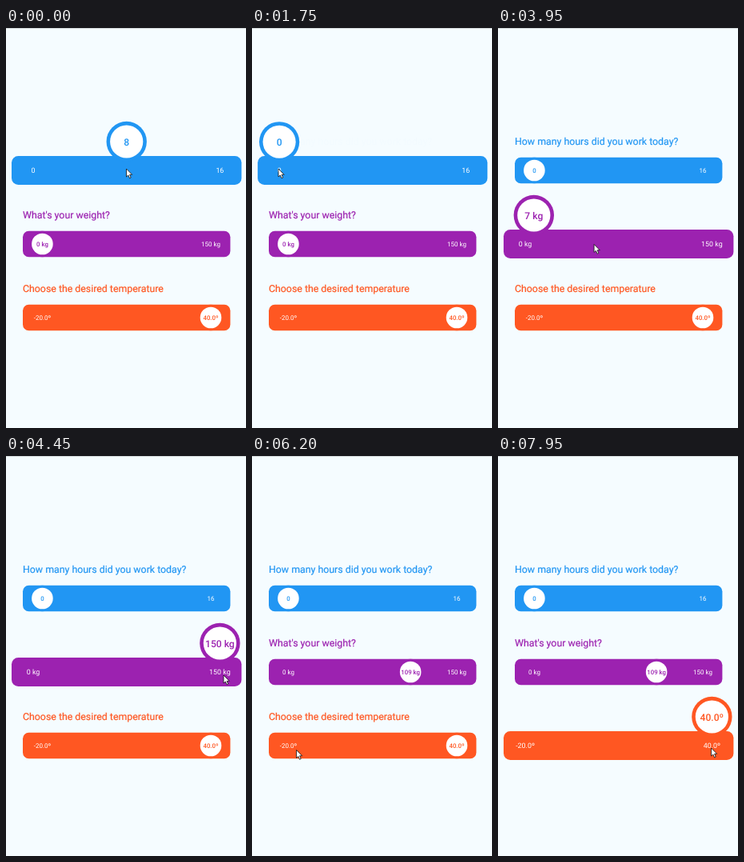
An HTML page for the animation above (8 s loop, 300 by 500 pixels).

```html
<!DOCTYPE html>
<html lang="en">
<head>
<meta charset="utf-8">
<title>Fluid sliders</title>
<style>
  html, body { margin: 0; width: 100%; height: 100%; overflow: hidden; background: #f5fcff; }
  svg { display: block; width: 100vw; height: 100vh; }
  text { font-family: Roboto, Arial, sans-serif; text-rendering: geometricPrecision; }
  .mid { text-anchor: middle; }
</style>
</head>
<body>
<svg id="stage" viewBox="0 0 300 500"></svg>
<script>
const LOOP = 8000;
const LAG = 130; // the knob trails the pointer
const CX = 150.7, SPAN = 210.6, WIDTH = 259.4, HEIGHT = 32.4, GROW = 0.108;
const stage = document.getElementById('stage');

function set(el, attrs) {
  for (const k in attrs) el.setAttribute(k, attrs[k]);
}

function add(parent, tag, attrs, text) {
  const el = document.createElementNS('http://www.w3.org/2000/svg', tag);
  set(el, attrs);
  if (text !== undefined) el.textContent = text;
  return parent.appendChild(el);
}

const clamp = v => Math.min(1, Math.max(0, v));
const smooth = u => u * u * (3 - 2 * u);
const easeOut = u => 1 - (1 - u) ** 3;
const easeBack = u => 1 + 2.70158 * (u - 1) ** 3 + 1.70158 * (u - 1) ** 2;

const sliders = [
  {
    title: 'How many hours did you work today?', color: '#2196f3',
    min: 0, max: 16, initial: 8, format: v => String(Math.round(v)),
    press: -LOOP, drag: 0, release: 1750
  },
  {
    title: "What's your weight?", color: '#9c22b0',
    min: 0, max: 150, initial: 0, format: v => Math.round(v) + ' kg',
    press: 3050, drag: 3785, release: 5230
  },
  {
    title: 'Choose the desired temperature', color: '#ff5722',
    min: -20, max: 40, initial: 40, format: v => v.toFixed(1) + 'º',
    press: 7300, drag: Infinity, release: Infinity
  }
];

// Pointer moves: from, to, target x, target y
const home = { x: 150.5, y: 176 };
const moves = [
  [0, 1180, 33, 176],
  [1800, 2350, 44, 277],
  [2400, 2650, 40, 268.5],
  [3785, 4205, 272, 274],
  [4500, 4950, 202.5, 274],
  [5000, 5200, 204, 274],
  [5280, 5700, 130, 388],
  [5700, 6150, 55.5, 367.5],
  [6400, 7150, 266.5, 365]
];

function pointerAt(t) {
  let { x, y } = home;
  for (const [from, to, tx, ty] of moves) {
    const u = smooth(clamp((t - from) / (to - from)));
    x += (tx - x) * u;
    y += (ty - y) * u;
  }
  return { x, y };
}

function fractionAt(s, t) {
  const seen = Math.min(t, s.release) - LAG;
  if (seen < s.drag) return (s.initial - s.min) / (s.max - s.min);
  return clamp((pointerAt(seen).x - CX) / (SPAN * (1 + GROW)) + 0.5);
}

function build(s, i) {
  const fill = s.color;
  s.y = 178 + 92 * i;
  s.label = add(stage, 'text', {
    x: 21, y: s.y - 32, fill, stroke: fill, 'stroke-width': 0.2, 'font-size': 12.35
  }, s.title);
  s.track = add(stage, 'g', {});
  add(s.track, 'rect', { x: -WIDTH / 2, y: -HEIGHT / 2, width: WIDTH, height: HEIGHT, rx: 7.5, fill });
  for (const [v, side] of [[s.min, -1], [s.max, 1]]) {
    add(s.track, 'text', {
      class: 'mid', x: side * SPAN / 2, y: 2.8, fill: '#fff', 'font-size': 8
    }, s.format(v));
  }
  s.knob = add(stage, 'g', {});
  add(s.knob, 'circle', { r: 16.25, fill });
  add(s.knob, 'circle', { r: 13.3, fill: '#fff' });
  s.value = add(s.knob, 'text', {
    class: 'mid', y: 3.1, fill, 'font-size': 7.8, 'font-weight': 500
  });
}

function update(s, t) {
  const up = clamp((t - s.press) / 400);
  const rest = 1 - easeOut(clamp((t - s.release) / 370));
  const lift = easeBack(up) * rest, open = easeOut(up) * rest;
  const scale = 1 + GROW * open;
  const f = fractionAt(s, t);
  const x = CX + (f - 0.5) * SPAN * scale;

  set(s.label, { opacity: 1 - open });
  set(s.track, { transform: `translate(${CX} ${s.y}) scale(${scale})` });
  set(s.knob, { transform: `translate(${x} ${s.y - 36 * lift}) scale(${1 + 0.55 * lift})` });
  s.value.textContent = s.format(s.min + f * (s.max - s.min));
}

sliders.forEach(build);
add(stage, 'rect', { width: 300, height: 1, fill: '#d3d8da' });
const cursor = add(stage, 'path', {
  d: 'M0 0V10L2.3 8L4 11.8L5.7 11L4.1 7.3H7.2Z',
  fill: '#fff', stroke: '#111', 'stroke-width': 0.8, 'stroke-linejoin': 'round'
});

function draw(t) {
  sliders.forEach(s => update(s, t));
  const { x, y } = pointerAt(t);
  set(cursor, { transform: `translate(${x} ${y})` });
}

const start = performance.now();
function tick() {
  draw((performance.now() - start) % LOOP);
  requestAnimationFrame(tick);
}
tick();
</script>
</body>
</html>
```
